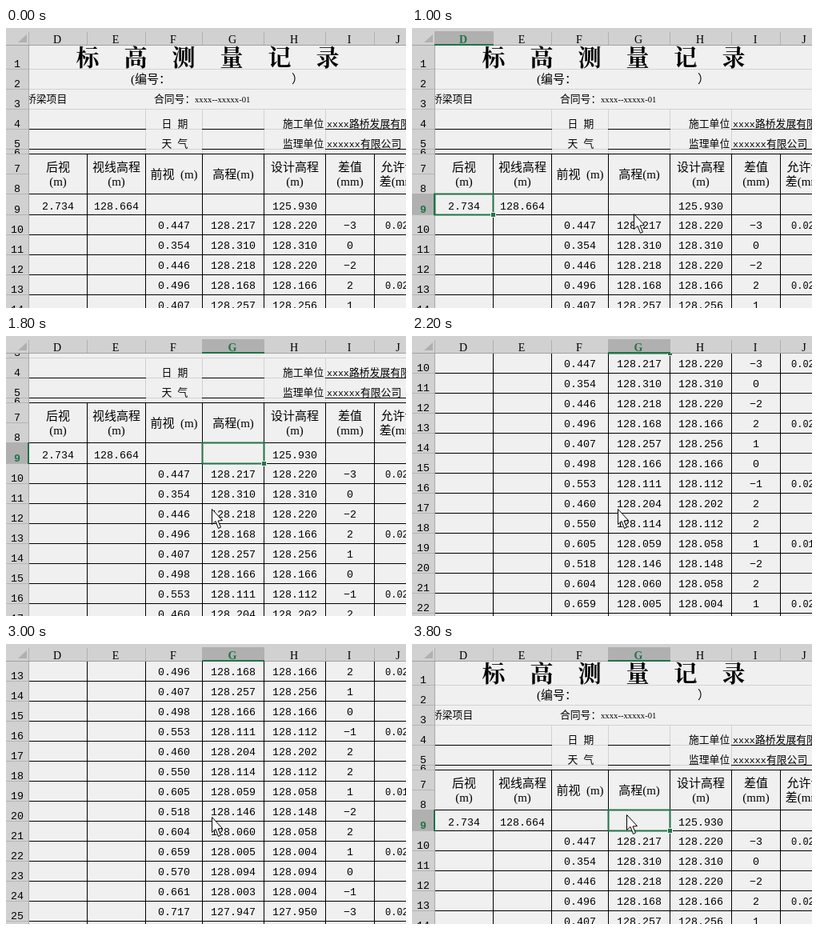
Recreate the animation shown at these times as an HTML page with a canvas. Size 500 by 350 pixels, loop 4000 ms.

```html
<!DOCTYPE html>
<html lang="zh-CN">
<head>
<meta charset="utf-8">
<title>标高测量记录</title>
<style>
html, body { margin: 0; width: 100%; height: 100%; overflow: hidden; background: #f0f0f0; }
canvas { display: block; }
</style>
</head>
<body>
<canvas id="stage" width="500" height="350"></canvas>
<script>
const ctx = document.getElementById('stage').getContext('2d');
const W = 500, H = 350, HEAD = 21, SIDE = 28, STEP = 200, LOOP = 4000, LAST = 33;
const MONO = '"Liberation Mono", monospace';
const SERIF = '"Liberation Serif", serif';
const HAN = '"Liberation Serif", "Noto Sans CJK SC", "Noto Sans CJK", sans-serif';
const INK = '#000', GREEN = '#217346', PAPER = '#f0f0f0', BAR = '#d1d1d1', LIT = '#b0b0b0', GRID = '#d2d2d2';
const NUM = '13.33px ' + MONO, BODY = '15px ' + HAN, SMALL = '12.8px ' + HAN;

// running sums of the column widths D..J and the row heights
const sums = (start, sizes) => sizes.reduce((all, s) => [...all, all.at(-1) + s], [start]);
const rowHeight = r => r === 1 ? 31 : r === 6 ? 6 : r === 9 ? 26 : 25;
const colX = sums(SIDE, [73, 73, 71, 77, 77, 61, 61]);
const rowY = sums(HEAD - 1, Array.from({ length: LAST }, (_, i) => rowHeight(i + 1)));
const rowTop = r => rowY[r - 1];
const mid = c => (colX[c] + colX[c + 1]) / 2 + 0.5;
const BOTTOM = rowTop(LAST);

// measured minus designed height, in mm
const errors = [-3, 0, -2, 2, 1, 0, -1, 2, 2, 1, -2, 2, 1, 0, -1, -3, -2, -1, -2];
const SIGHT = 128.664;
// the road falls 54 mm per cross section; its middle point lies 90 mm higher
const design = i => 128.22 - 0.054 * Math.floor(i / 3) + (i % 3 === 1 ? 0.09 : 0);

// [step, wheel clicks], three rows per click
const wheel = [[8, 0], [9, 0.93], [11, 3], [14, 6], [15, 4], [17, 0.06], [18, 0]];
// [step, x, y], held until the next one
const pointer = [[1, 371, 342], [2, 361, 325], [3, 308, 268], [4, 275, 239], [5, 277, 232], [6, 263, 214], [8, 257, 216], [19, 268, 213]];

function lerpKeys(keys, t) {
  const n = keys.findIndex(k => k[0] > t);
  if (n < 1) return 0;
  const [t0, a] = keys[n - 1], [t1, b] = keys[n];
  return a + (b - a) * (t - t0) / (t1 - t0);
}

function scrollAt(i) {
  const clicks = lerpKeys(wheel, i), whole = Math.floor(clicks);
  const stop = k => k ? rowTop(1 + 3 * k) - HEAD : 0;
  return Math.round(stop(whole) + (stop(whole + 1) - stop(whole)) * (clicks - whole));
}

function box(x, y, w, h, color) {
  ctx.fillStyle = color;
  ctx.fillRect(x, y, w, h);
}

function text(str, x, y, font, align = 'center', color = INK) {
  ctx.font = font;
  ctx.textAlign = align;
  ctx.fillStyle = color;
  ctx.fillText(str, x, y);
}

function clipped(x, y, w, h, draw) {
  ctx.save();
  ctx.beginPath();
  ctx.rect(x, y, w, h);
  ctx.clip();
  draw();
  ctx.restore();
}

function drawForm() {
  for (let r = 2; r <= 6; r++) box(SIDE, rowTop(r), W, 1, GRID);
  for (const x of colX.slice(2, 6)) box(x, rowTop(4), 1, rowTop(7) - rowTop(4), GRID);
  for (const r of [5, 6])
    for (const [c, end] of [[0, 2], [3, 4], [5, 7]])
      box(colX[c], rowTop(r), colX[end] - colX[c] + 1, 1, INK);

  [...'标高测量记录'].forEach((ch, i) =>
    text(ch, 102 + i * 60, 48, 'bold 29px "Noto Serif CJK SC", "Noto Sans CJK SC", "Noto Sans CJK", serif'));

  text('(编号：', 156, 69, BODY, 'left');
  text('）', 357, 69, BODY, 'left');
  text('桥梁项目', 25, 93, SMALL, 'left');
  text('合同号：', 185, 93, SMALL, 'left');
  text('xxxx--xxxxx-01', 236, 93, '10.7px ' + SERIF, 'left');
  [['日期', '施工单位', 'xxxx', '路桥发展有限公司'], ['天气', '监理单位', 'xxxxxx', '有限公司']].forEach(([label, unit, prefix, firm], n) => {
    const y = 124 + 25 * n;
    text(label[0], 201, y, SMALL);
    text(label[1], 221, y, SMALL);
    text(unit, 346, y, SMALL, 'left');
    text(prefix, 401, y, '11.6px ' + MONO, 'left');
    text(firm, 401 + prefix.length * 7, y, SMALL, 'left');
  });

  ['后视/(m)', '视线高程/(m)', '前视  (m)', '高程(m)', '设计高程/(m)', '差值/(mm)', '允许误/差(mm)'].forEach((title, c) => {
    const lines = title.split('/');
    lines.forEach((s, n) => text(s, mid(c), lines.length > 1 ? 179 + 18 * n : 188, BODY));
  });
}

function drawTable() {
  box(SIDE, rowTop(7), W, 1, INK);
  for (let r = 9; r <= LAST; r++) box(SIDE, rowTop(r), W, 1, INK);
  for (const x of colX.slice(1)) box(x, rowTop(7), 1, BOTTOM - rowTop(7), INK);
  text('2.734', mid(0), 227, NUM);
  text(SIGHT.toFixed(3), mid(1), 227, NUM);
  text('125.930', mid(4), 227, NUM);
  for (let i = 0; i + 10 < LAST; i++) {
    const y = rowTop(10 + i) + 18, error = errors[i % errors.length];
    const level = design(i) + error / 1000;
    const cells = [SIGHT - level, level, design(i)].map(v => v.toFixed(3));
    [...cells, String(error).replace('-', '−')].forEach((s, c) => text(s, mid(c + 2), y, NUM));
    if (i % 3 === 0) text(i === 9 ? '0.01' : '0.02', 474, y, '12px ' + MONO, 'left');
  }
}

function drawRowLabels(selected) {
  box(0, HEAD, SIDE, BOTTOM, BAR);
  for (let r = 1; r < LAST; r++) {
    const y = rowTop(r), h = rowHeight(r), on = selected && r === 9;
    if (on) box(0, y, SIDE, h, LIT);
    box(0, y + h, SIDE, 1, '#b5b5b5');
    clipped(0, y, SIDE, h, () =>
      text(r, 14, y + Math.max(h - 2, 9), (on ? 'bold ' : '') + NUM, 'center', on ? GREEN : INK));
  }
  box(SIDE, HEAD, 1, BOTTOM, '#a8a8a8');
  if (selected) box(SIDE - 1, rowTop(9), 2, 27, GREEN);
}

function drawSelection([a, b]) {
  const y = rowTop(9), end = rowTop(10);
  ctx.strokeStyle = GREEN;
  ctx.lineWidth = 2;
  ctx.strokeRect(a + 0.5, y + 0.5, b - a, end - y);
  box(b - 3, end - 3, 7, 7, PAPER);
  box(b - 2, end - 2, 5, 5, GREEN);
}

function drawColumnHeads(active, span) {
  box(0, 0, W, HEAD, BAR);
  if (active >= 0) box(colX[active], 4, colX[active + 1] - colX[active] + 1, HEAD - 4, LIT);
  for (const x of colX) box(x, 5, 1, HEAD - 5, '#b0b0b0');
  box(0, HEAD, W, 1, '#a0a0a0');
  [...'DEFGHIJ'].forEach((ch, c) => {
    const on = c === active;
    text(ch, mid(c) - 1, 19, (on ? 'bold ' : '') + '14px ' + SERIF, 'center', on ? GREEN : INK);
  });
  if (span) box(span[0], 20, span[1] - span[0] + 1, 2, GREEN);
  ctx.fillStyle = '#b0b0b0';
  ctx.beginPath();
  ctx.moveTo(26, 8);
  ctx.lineTo(26, 18);
  ctx.lineTo(15, 18);
  ctx.fill();
}

function drawPointer([, x, y]) {
  ctx.save();
  ctx.translate(x + 0.5, y + 0.5);
  const shape = new Path2D('M0 0V19L4.5 15L8 24L11 22.5L7.5 14.5L13 14Z');
  ctx.fillStyle = '#fafafa';
  ctx.fill(shape);
  ctx.strokeStyle = INK;
  ctx.lineWidth = 1;
  ctx.stroke(shape);
  ctx.restore();
}

function render(now) {
  const i = Math.floor(now % LOOP / STEP);
  const active = i < 4 ? -1 : i < 6 ? 0 : 3;
  // the frame glides from D9 to G9 and is caught once on the way
  const glide = i < 6 ? 0 : i === 6 ? 0.774 : 1;
  const span = active < 0 ? null : [0, 1].map(c => Math.round(colX[c] + (colX[c + 3] - colX[c]) * glide));

  box(0, 0, W, H, PAPER);
  drawColumnHeads(active, span);
  clipped(0, HEAD + 1, W, H, () => {
    ctx.translate(0, -scrollAt(i));
    drawForm();
    drawTable();
    drawRowLabels(span);
    if (span) drawSelection(span);
  });
  const tip = pointer.findLast(key => key[0] <= i);
  if (tip) drawPointer(tip);
  requestAnimationFrame(render);
}

requestAnimationFrame(render);
</script>
</body>
</html>
```
